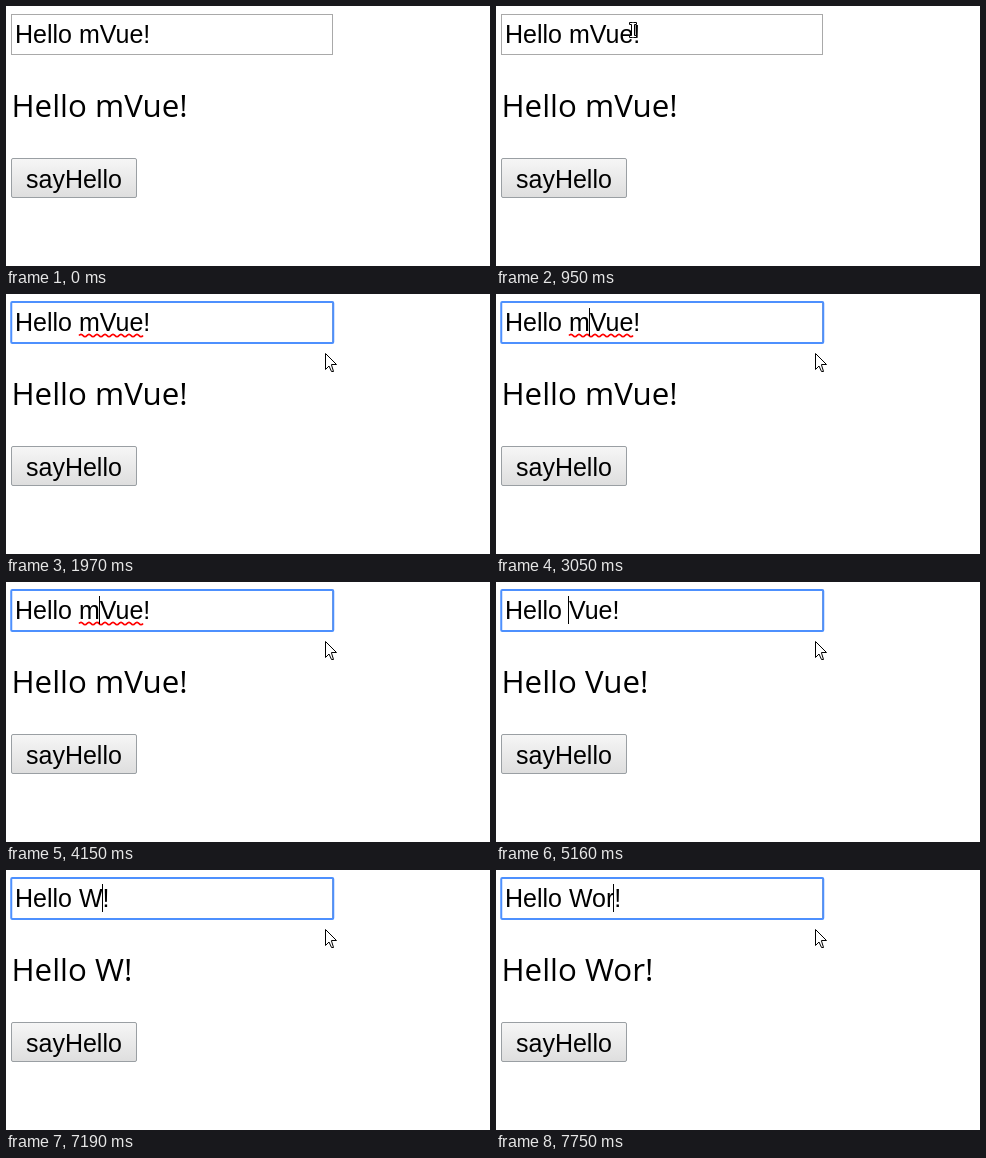
An HTML page that plays this animation: 484 px wide and 260 px high, repeating every 8 s.

```html
<!DOCTYPE html>
<html lang="en">
<head>
<meta charset="utf-8">
<title>Two-way binding</title>
<style>
  html, body { margin: 0; width: 100%; height: 100%; overflow: hidden; background: #fff; }
  svg { display: block; width: 484px; height: 260px; }
  text { white-space: pre; fill: #000; }
  .control { font: 25px "Liberation Sans", Arial, sans-serif; }
  .output { font: 31.3px "Open Sans", "Noto Sans", sans-serif; }
</style>
</head>
<body>
<svg viewBox="0 0 484 260">
  <defs>
    <linearGradient id="face" x2="0" y2="1">
      <stop offset="0" stop-color="#f6f6f6"/>
      <stop offset="1" stop-color="#dedede"/>
    </linearGradient>
  </defs>

  <rect x="5.5" y="8.5" width="321" height="40" fill="#fff" stroke="#a9a9a9"/>
  <rect id="focus" x="5.25" y="8" width="322" height="41" rx="1" fill="none" stroke="#4d90fe" stroke-width="2"/>
  <text id="field" class="control" x="9" y="37"></text>
  <path id="squiggle" fill="none" stroke="#f00" stroke-width="1.8"/>
  <rect id="caret" y="14" width="1" height="28"/>

  <text id="output" class="output" x="5.5" y="111"></text>

  <rect x="5.5" y="152.5" width="125" height="39" rx="1.5" fill="url(#face)" stroke="#9a9fa3"/>
  <text class="control" x="20" y="182">sayHello</text>

  <g fill="#fff" stroke="#000">
    <path id="arrow" d="M.5.5V16.5L4 13L6.5 18.5H8.5L6.5 12V11.5H11.5Z"/>
    <path id="beam" d="M-3.5 -7.5H-.5L0 -7L.5 -7.5H3.5V-5.5H1.5V5.5H3.5V7.5H.5L0 7L-.5 7.5H-3.5V5.5H-1.5V-5.5H-3.5Z"/>
  </g>
</svg>
<script>
const LOOP = 8000;
const CLICK = 1260;

// [time, word, caret x or 0 when hidden]
const EDITS = [
  [0, 'mVue', 0], [CLICK, 'mVue', 136], [1970, 'mVue', 0], [2520, 'mVue', 136],
  [2750, 'mVue', 122], [2900, 'mVue', 108], [3050, 'mVue', 93], [3220, 'mVue', 72],
  [3770, 'mVue', 0], [4150, 'mVue', 93],
  [4550, 'Vue', 72], [4630, 'Vue', 0], [5160, 'Vue', 72],
  [5560, 'ue', 72], [5710, 'e', 0], [5880, '', 0],
  [6270, '', 72], [6730, '', 0],
  [7190, 'W', 96], [7420, 'Wo', 109], [7750, 'Wor', 117]
];

const el = id => document.getElementById(id);
const [focusRing, field, squiggle, caret, output, arrow, beam] =
  ['focus', 'field', 'squiggle', 'caret', 'output', 'arrow', 'beam'].map(el);

const show = (node, on) => node.setAttribute('visibility', on ? 'visible' : 'hidden');
const inside = (x, y, left, top, right, bottom) => x >= left && x < right && y >= top && y < bottom;

squiggle.setAttribute('d', 'M73 41.5' + 'q2 -2.4 4 0t4 0'.repeat(8));

// Pointer samples arrive in discrete steps.
function stepped(t, start, end, count) {
  const step = Math.floor((t - start) / (end - start) * (count - 1) + 1e-6);
  return Math.max(0, Math.min(1, step / (count - 1)));
}

function pointerAt(t) {
  if (t < 70) return null;
  if (t < 950) {
    const p = stepped(t, 70, 780, 10), q = 1 - p;
    const curve = (a, b, c) => q * q * a + 2 * q * p * b + p * p * c;
    return [curve(276, 105, 136), curve(221, 30, 24)].map(Math.round);
  }
  const p = stepped(t, CLICK, 1800, 8);
  const eased = p * p * (3 - 2 * p);
  return [137 + 182 * eased, 24 + 35 * eased].map(Math.round);
}

function drawPointer(t) {
  const pos = pointerAt(t);
  const overText = pos && (inside(...pos, 5, 8, 327, 49) || inside(...pos, 5, 80, 183, 122));
  show(beam, overText);
  show(arrow, pos && !overText);
  if (pos) (overText ? beam : arrow).setAttribute('transform', `translate(${pos})`);
}

function render(t) {
  const [, word, caretX] = EDITS.filter(edit => edit[0] <= t).pop();
  const message = `Hello ${word}!`;
  if (field.textContent !== message) field.textContent = output.textContent = message;
  show(focusRing, t >= CLICK);
  show(squiggle, t >= CLICK && word === 'mVue');
  show(caret, caretX > 0);
  caret.setAttribute('x', caretX);
  drawPointer(t);
}

const origin = performance.now();
function tick() {
  render((performance.now() - origin) % LOOP);
  requestAnimationFrame(tick);
}
tick();
</script>
</body>
</html>
```
